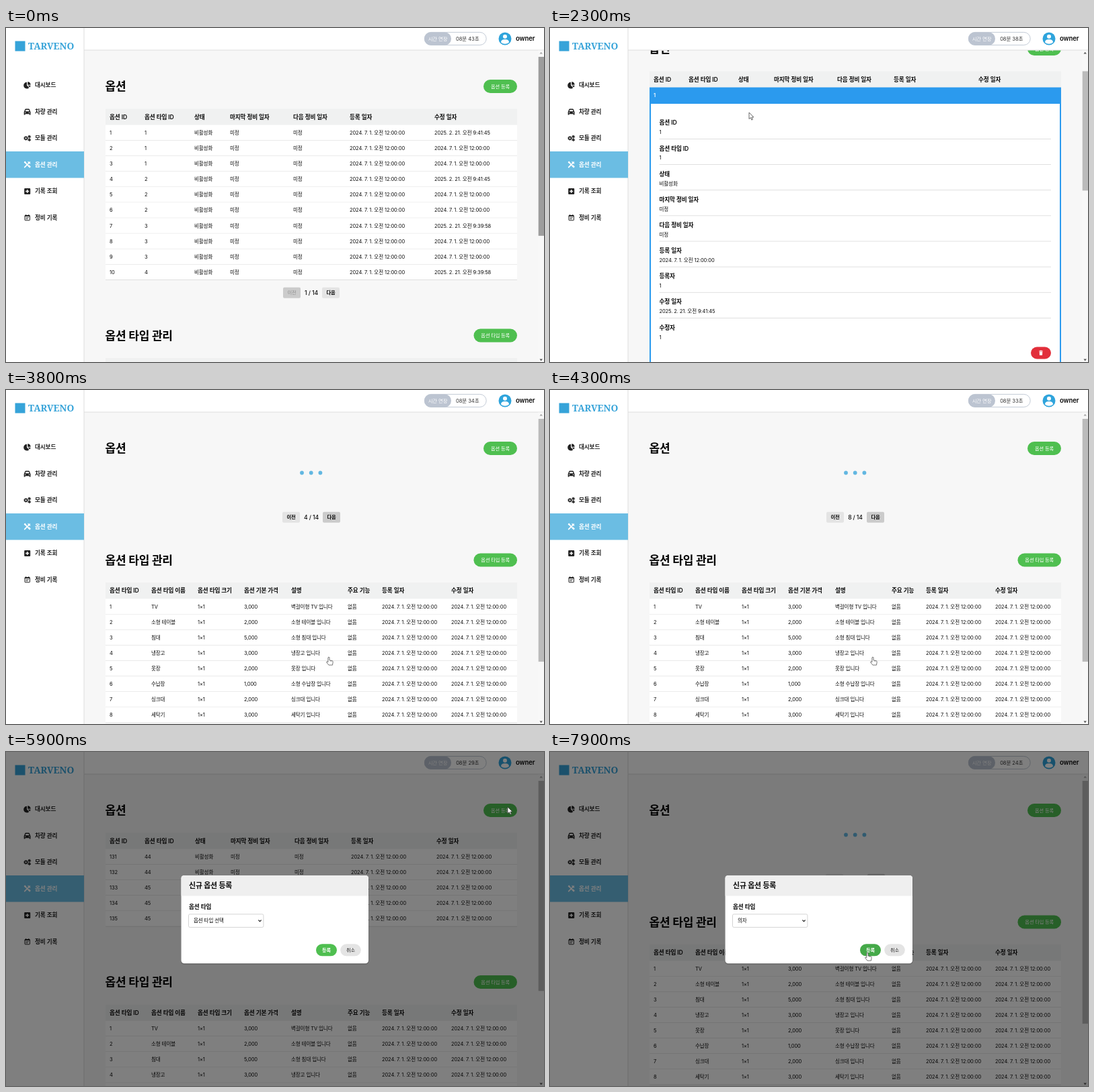
These frames come from a looping animation (800x498 px, 8000 ms). An HTML page:

```html
<!DOCTYPE html>
<html lang="ko">
<head>
<meta charset="utf-8">
<style>
html, body { margin: 0; width: 100%; height: 100%; overflow: hidden; background: #f7f7f7; }
svg { display: block; width: 800px; height: 498px; }
text { font-family: Inter, "Noto Sans CJK KR", "Noto Sans CJK", sans-serif; letter-spacing: -.013em; white-space: pre; }
.brand { font-family: "Noto Serif", serif; letter-spacing: 0; }
</style>
</head>
<body>
<svg viewBox="0 0 800 498">
  <g id="page"></g>
  <g id="chrome"></g>
  <g id="bar"></g>
  <g id="clock"></g>
  <g id="modal"></g>
  <g id="hand"></g>
  <g id="arrow"></g>
</svg>
<script>
const LOOP = 8000, ROW = 23.1, DETAIL = 389;
const GREEN = '#4fbf50', BLUE = '#2b9aee', SKY = '#6bbde3', INK = '#0a0a0a';
const DAY = '2024. 7. 1. 오전 12:00:00';
const $ = id => document.getElementById(id);

// ---- drawing helpers: y is the vertical middle of a text line
const text = (x, y, s, size = 7.5, fill = INK, weight = 400, extra = '') =>
  `<text x="${x}" y="${y + size * .36}" font-size="${size}" fill="${fill}" font-weight="${weight}" ${extra}>${s}</text>`;
const mid = (x, y, s, size, fill, weight) => text(x, y, s, size, fill, weight, 'text-anchor="middle"');
const rect = (x, y, w, h, fill, r = 0, extra = '') =>
  `<rect x="${x}" y="${y}" width="${w}" height="${h}" fill="${fill}" rx="${r}" ${extra}/>`;
const dot = (x, y, r, fill) => `<circle cx="${x}" cy="${y}" r="${r}" fill="${fill}"/>`;
const path = (d, fill, extra = '') => `<path d="${d}" fill="${fill}" ${extra}/>`;
const pill = (x, y, w, h, label, fill, ink = '#fff', size = 7.2, weight = 500) =>
  rect(x, y - h / 2, w, h, fill, h / 2) + mid(x + w / 2, y, label, size, ink, weight);
const title = (y, s) => text(147.6, y, s, 17, '#000', 700);
const cells = (cols, y, values, size, weight) =>
  values.map((v, i) => text(cols[i], y, v, size, INK, weight)).join('');

// ---- data
const OPTION_HEAD = ['옵션 ID', '옵션 타입 ID', '상태', '마지막 정비 일자', '다음 정비 일자', '등록 일자', '수정 일자'];
const COLS = [154, 206, 280, 333, 427, 511, 637];
const WIDE_COLS = [154, 206, 281, 334, 429, 513, 640];
const TYPE_HEAD = ['옵션 타입 ID', '옵션 타입 이름', '옵션 타입 크기', '옵션 기본 가격', '설명', '주요 기능', '등록 일자', '수정 일자'];
const TYPE_COLS = [154, 216, 285, 354, 424, 508, 559, 662];
const TYPES = [
  ['TV', '3,000', '벽걸이형 TV'], ['소형 테이블', '2,000', '소형 테이블'],
  ['침대', '5,000', '소형 침대'], ['냉장고', '3,000', '냉장고'],
  ['옷장', '2,000', '옷장'], ['수납장', '1,000', '소형 수납장'],
  ['싱크대', '2,000', '싱크대'], ['세탁기', '3,000', '세탁기']
];
const EDITED = { 1: '9:41:45', 4: '9:41:45', 7: '9:39:58', 10: '9:39:58' };
const editedAt = id => EDITED[id] ? `2025. 2. 21. 오전 ${EDITED[id]}` : DAY;
const optionRow = id => [id, Math.ceil(id / 3), '비활성화', '미정', '미정', DAY, editedAt(id)];

// ---- timed steps
const SCROLL = [[0, 0], [1150, 0], [1450, 46], [1750, 46], [1950, 56], [2750, 56], [3050, 111.6], [3200, 111.6], [3400, 0]];
const POINTER = [
  [0, 815, 470, 'arrow'], [150, 815, 470, 'arrow'], [850, 427, 149.5, 'hand'], [1600, 427, 149.5, 'hand'],
  [1700, 427, 149.5, 'arrow'], [2250, 296, 126, 'arrow'], [2350, 296, 126, 'arrow'], [2520, 300, 99, 'hand'],
  [2680, 300, 99, 'hand'], [3050, 497.4, 190, 'hand'], [3150, 497.4, 190, 'hand'], [3430, 480, 398, 'hand'],
  [5120, 480, 398, 'arrow'], [5480, 746, 82, 'arrow'], [6380, 746, 82, 'arrow'], [6640, 327, 249, 'arrow'],
  [6760, 327, 249, 'arrow'], [7000, 300, 402, 'arrow'], [7150, 300, 402, 'arrow'], [7550, 472, 299, 'hand']
];
const BAR_HELD = 250, EXPAND = [1000, 2650], FIRST_CLICK = 3500, CLICK_GAP = 130, LOAD = 70;
const MODAL_AT = 5600, LIST = [6720, 7100], SUBMIT = 7780;

function track(steps, t) {
  let i = steps.length - 1;
  while (steps[i][0] > t) i--;
  const a = steps[i], b = steps[i + 1] || a;
  const p = b === a ? 0 : (t - a[0]) / (b[0] - a[0]);
  const k = p * p * (3 - 2 * p);
  return a.map((v, n) => typeof v === 'number' ? v + (b[n] - v) * k : v);
}

function stateAt(t) {
  const clicks = t < FIRST_CLICK ? 0 : Math.min(13, Math.floor((t - FIRST_CLICK) / CLICK_GAP) + 1);
  const since = t - FIRST_CLICK - (clicks - 1) * CLICK_GAP;
  return {
    page: clicks + 1,
    loading: clicks > 0 && since < LOAD || t >= SUBMIT,
    open: t >= EXPAND[0] && t < EXPAND[1],
    hover: t >= 3430 && t < 5150,
    held: t < BAR_HELD
  };
}
const rowsOn = page => page === 14 ? 5 : 10;
const typeTop = s => s.loading ? 253 : 227 + ROW * rowsOn(s.page) + (s.open ? DETAIL : 0);

// ---- page parts
const tableHead = (y, cols, names) =>
  rect(148, y - 12, 612, 24, '#f0f1f1') + cells(cols, y, names, 8.6, 600);
const tableRow = (y, cols, values) =>
  rect(148, y - 11.5, 612, ROW, '#fff') + rect(148, y + 11.1, 612, .8, '#d9d9d9') + cells(cols, y, values);

function detail() {
  const row = optionRow(1);
  const fields = [...OPTION_HEAD.slice(0, 6), '등록자', '수정 일자', '수정자'];
  const values = [...row.slice(0, 6), 1, row[6], 1];
  let out = rect(148, 144.5, 612, 24, BLUE) + text(154, 156.2, 1, 7.5, '#fff', 600);
  out += rect(149, 168, 610, DETAIL - 1, '#fff', 0, `stroke="${BLUE}" stroke-width="2"`);
  fields.forEach((name, i) => {
    const y = 197.3 + i * 38.15;
    out += text(162.5, y, name, 8.6, INK, 600) + text(162.5, y + 14.3, values[i]);
    if (i < 8) out += rect(162.5, y + 23.7, 582.5, .8, '#d9d9d9');
  });
  out += rect(715, 531.5, 30, 18, '#e22f3b', 9);
  return out + path('M727.3 537.3h1.4l.5-.6h1.6l.5.6h1.4v1h-5.4zM727.7 538.8h4.6l-.3 5.2h-4z', '#fff');
}

function pager(y, s) {
  const half = s.page < 2 ? 16 : s.page < 10 ? 17 : 18;
  const button = (x, label, off, hot) =>
    rect(x, y - 8, 26, 16, off || hot ? '#cbcbcb' : '#e4e4e4', 2) + mid(x + 13, y, label, 7.3, off ? '#929292' : INK, off ? 500 : 600);
  return button(454 - half - 26, '이전', s.page === 1) + mid(454, y, `${s.page} / 14`, 8.6, INK, 500) +
    button(454 + half, '다음', s.page === 14, s.hover);
}

function pageMarkup(s) {
  const top = typeTop(s), cols = s.page > 10 ? WIDE_COLS : COLS;
  let out = title(87.2, '옵션') + pill(710, 87, 50, 20, '옵션 등록', GREEN);
  if (s.loading) {
    out += [440, 453.7, 467.4].map(x => dot(x, 123.5, 2.9, '#62b7e1')).join('');
  } else {
    out += tableHead(132.5, cols, OPTION_HEAD);
    for (let i = 0; i < rowsOn(s.page); i++) {
      const y = 156.2 + i * ROW + (s.open && i ? DETAIL : 0);
      out += s.open && !i ? detail() : tableRow(y, cols, optionRow((s.page - 1) * 10 + i + 1));
    }
  }
  out += pager(top - 63.3, s);
  out += title(top + .8, '옵션 타입 관리') + pill(695.5, top + .5, 64.5, 20, '옵션 타입 등록', GREEN);
  out += tableHead(top + 46.2, TYPE_COLS, TYPE_HEAD);
  TYPES.forEach(([name, price, about], i) => {
    out += tableRow(top + 69.9 + i * ROW, TYPE_COLS, [i + 1, name, '1×1', price, about + ' 입니다', '없음', DAY, DAY]);
  });
  return out;
}

// ---- fixed frame
const gear = (x, y, r) => `<circle cx="${x}" cy="${y}" r="${r}" fill="none" stroke="#222" stroke-width="1.5"/>` +
  `<circle cx="${x}" cy="${y}" r="${r + 1}" fill="none" stroke="#222" stroke-width="1" stroke-dasharray="1.1 1.1"/>`;
const ICONS = [
  path('M31 80.8v4.7l3.4 3.4a4.8 4.8 0 1 1-3.4-8.1z', '#222') + path('M32.2 80.3a4.6 4.6 0 0 1 4.4 4.5h-4.4z', '#222') +
    path('M32.6 85.8h4a4.6 4.6 0 0 1-1.3 2.7z', '#222'),
  path('M26.7 125.2l1.5-3.7q.3-.9 1.2-.9h4.4q.9 0 1.2.9l1.5 3.7v4.2h-1.8v-1.2h-6.2v1.2h-1.8z', '#222') +
    path('M28.6 124.2l.9-2.2h4.2l.9 2.2z', '#fff') + dot(28.7, 126.2, .7, '#fff') + dot(34.5, 126.2, .7, '#fff'),
  gear(29.6, 164.3, 1.9) + gear(34.7, 162.1, 1) + gear(34.7, 166.7, 1),
  path('M28 200l7 7.4M35.3 200l-7.6 7.6', 'none', 'stroke="#fff" stroke-width="1.7" stroke-linecap="round"') +
    path('M26.6 200.3l1.7-1.7 2 2-1.7 1.7zM33 198.8l3.7 3.2-1.6.8-2.9-2.7zM33 205.8l1.5-1.5 2.4 2.5-1.6 1.7z', '#fff'),
  rect(27.2, 239, 9, 9, '#222', 1) + path('M31.7 241v5M29.2 243.5h5', 'none', 'stroke="#fff" stroke-width="1.4"'),
  rect(28, 279.4, 7.4, 7.4, 'none', .8, 'stroke="#222" stroke-width="1"') + rect(28, 279.4, 7.4, 1.6, '#222') +
    path('M29.6 278v2M33.8 278v2M29.5 282.7h4.4M29.5 284.6h3', 'none', 'stroke="#222" stroke-width=".9"')
];
const MENU = ['대시보드', '차량 관리', '모듈 관리', '옵션 관리', '기록 조회', '정비 기록'];

$('chrome').innerHTML =
  rect(116, 0, 684, 33, '#fff') + rect(116, 32.5, 684, 1, '#dedede') +
  rect(0, 0, 116, 498, '#fff') + rect(115.5, 0, 1, 498, '#dedede') +
  rect(13.5, 19.5, 15, 15, '#36a3d9') +
  text(33, 27, 'TARVENO', 13.8, '#36a3d9', 700, 'class="brand"') +
  rect(0, 184, 116, 39.5, SKY) +
  MENU.map((name, i) => ICONS[i] + text(43, 85.2 + i * 39.5, name, 8.6, i === 3 ? '#fff' : '#222', 600)).join('') +
  rect(622.4, 6.4, 91.8, 19, '#fff', 9.5, 'stroke="#bcc4d1" stroke-width=".9"') +
  pill(622, 16, 40, 19.5, '시간 연장', '#bcc4d1', '#fff', 7.4) +
  dot(742, 16, 9.5, '#2fa4dc') + dot(742, 12.8, 3, '#fff') +
  path('M736 21.4q0-4.4 6-4.4t6 4.4q-2.5 2.3-6 2.3t-6-2.3z', '#fff') +
  text(758, 16, 'owner', 9.6, INK, 600);

function barMarkup(s, scroll) {
  const height = 321 + typeTop(s), k = 447 / height;
  return rect(791, 33.5, 9, 464.5, '#f8f8f8') +
    path('M795.7 35.8l2.2 2.8h-4.4z', scroll > 0 ? '#555' : '#a5a5a5') +
    path('M795.7 496.4l2.2-2.8h-4.4z', '#555') +
    rect(791.7, 43 + scroll * k, 8.3, 465 * k, s.held ? '#9d9d9d' : '#bbb');
}

function modalMarkup(choice, listOpen, hot) {
  let out = rect(0, 0, 800, 498, 'rgba(0,0,0,.5)') +
    rect(260, 184.5, 279.5, 132.5, 'rgba(0,0,0,.16)', 5) + rect(260.5, 184, 278.5, 131.3, '#fff', 4.5) +
    path('M260.5 214.5v-26q0-4.5 4.5-4.5h269.5q4.5 0 4.5 4.5v26z', '#efefef') +
    text(272, 199.3, '신규 옵션 등록', 10.9, INK, 700) + text(272, 231, '옵션 타입', 8.6, INK, 600) +
    rect(271.5, 241.8, 111.4, 19.6, '#fff', 2, 'stroke="#c9c9c9" stroke-width=".8"') +
    text(279, 251.5, choice) +
    path('M375.4 250.5l2.1 2.1 2.1-2.1', 'none', 'stroke="#222" stroke-width="1.1"') +
    pill(461, 295.3, 31, 18, '등록', hot ? '#45a949' : GREEN, '#fff', 7.2, 600) +
    pill(497.2, 295.3, 30.6, 18, '취소', '#e4e4e4', '#222');
  if (listOpen) {
    const items = ['옵션 타입 선택', ...TYPES.map(v => v[0]), '의자'];
    out += rect(271.5, 262, 111.4, items.length * 15, '#fff', 0, 'stroke="#999" stroke-width=".7"');
    out += items.map((name, i) => text(279, 269.5 + i * 15, name)).join('');
  }
  return out;
}

$('arrow').innerHTML = path('M0 0v9.6l2.3-2 1.5 3.5 1.6-.7-1.5-3.4h3z', '#fff', 'stroke="#444" stroke-width=".8"');
$('hand').innerHTML = path('M-1.1 .9q1.1-1.7 2.1 0v4l4.2.9q1.2.4 1 1.7l-.7 4.6h-5.6l-3.3-4.2q.1-1.4 1.5-.8l.8.6z', '#fff',
  'stroke="#555" stroke-width=".8" stroke-linejoin="round"') +
  path('M2.4 5.2v1.6M4 5.6v1.5', 'none', 'stroke="#777" stroke-width=".6"');

// Rebuild a group only when its markup changes.
const last = {};
function put(id, key, make) {
  if (last[id] === key) return;
  last[id] = key;
  $(id).innerHTML = make();
}

function render(t) {
  const s = stateAt(t), scroll = track(SCROLL, t)[1];
  put('page', JSON.stringify(s), () => pageMarkup(s));
  $('page').setAttribute('transform', `translate(0 ${-scroll})`);
  put('bar', JSON.stringify(s) + scroll, () => barMarkup(s, scroll));

  const left = 523 - Math.floor(t * .0024 + .2);
  const two = n => String(n).padStart(2, '0');
  put('clock', left, () => mid(686.3, 16, `${two(Math.floor(left / 60))}분 ${two(left % 60)}초`, 7.6, '#333'));

  const shown = t >= MODAL_AT, list = t >= LIST[0] && t < LIST[1];
  const choice = t < LIST[1] ? '옵션 타입 선택' : '의자', hot = t >= 7530;
  put('modal', [shown, list, choice, hot].join(), () => shown ? modalMarkup(choice, list, hot) : '');

  const [, x, y, kind] = track(POINTER, t);
  for (const id of ['hand', 'arrow']) {
    $(id).setAttribute('transform', `translate(${x} ${y})`);
    $(id).setAttribute('visibility', id === kind ? 'visible' : 'hidden');
  }
}

const start = performance.now();
function tick() {
  render((performance.now() - start) % LOOP);
  requestAnimationFrame(tick);
}
tick();
</script>
</body>
</html>
```
